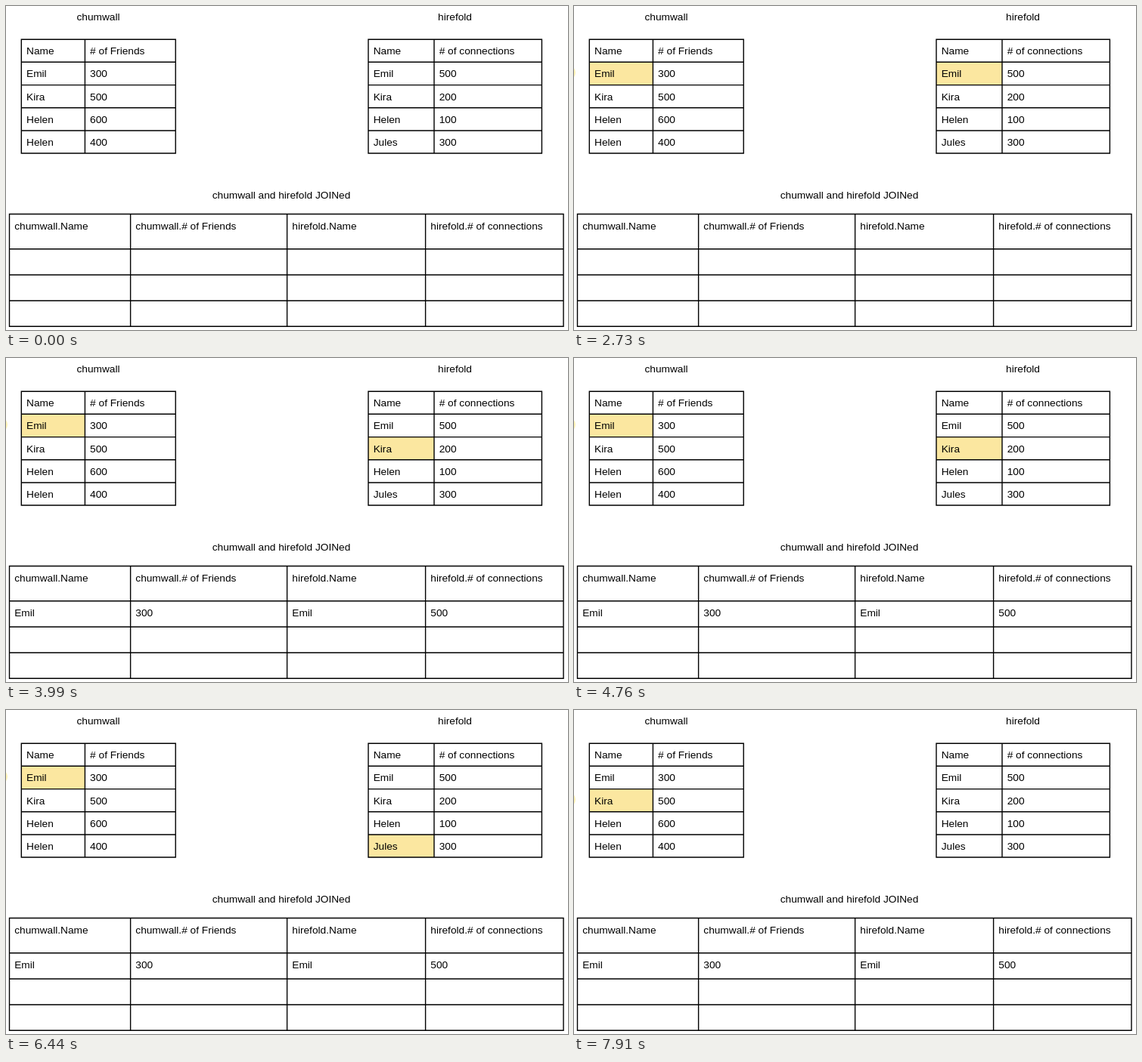
Recreate the animation shown at these times as an HTML page with a canvas. Size 743 by 429 pixels, loop 8000 ms.

```html
<!DOCTYPE html>
<html lang="en">
<head>
<meta charset="utf-8">
<title>Join, step by step</title>
<style>
  html, body { margin: 0; width: 100%; height: 100%; overflow: hidden; background: #fff; }
  canvas { display: block; width: 743px; height: 429px; }
</style>
</head>
<body>
<canvas id="stage"></canvas>
<script>
const W = 743, H = 429, LOOP = 8000;
const YELLOW = '#fbe7a0', GREEN = '#bbddab', HALO = '#fdf3b4';
const LEFT = 'chumwall', RIGHT = 'hirefold';

const canvas = document.getElementById('stage');
const scale = window.devicePixelRatio || 1;
canvas.width = W * scale;
canvas.height = H * scale;
const ctx = canvas.getContext('2d');
ctx.scale(scale, scale);

const sourceRows = [44.2, 74.3, 104.6, 134.8, 165, 195];
const friends = {
  xs: [20.3, 104.4, 224.2], ys: sourceRows,
  cells: [['Name', '# of Friends'], ['Emil', '300'], ['Kira', '500'], ['Helen', '600'], ['Helen', '400']]
};
const connections = {
  xs: [479, 566, 708.4], ys: sourceRows,
  cells: [['Name', '# of connections'], ['Emil', '500'], ['Kira', '200'], ['Helen', '100'], ['Jules', '300']]
};
const joined = {
  xs: [4.5, 164.6, 371.6, 554.6, 737], ys: [275.5, 321.7, 356, 390.2, 424.2],
  cells: [[LEFT + '.Name', LEFT + '.# of Friends', RIGHT + '.Name', RIGHT + '.# of connections']]
};
const match = ['Emil', '300', 'Emil', '500'];

// Each step: start time, highlighted left row, highlighted right row, match found
const steps = [
  [0, 0, 0, false],
  [280, 1, 0, false],
  [840, 1, 1, false],
  [3220, 1, 1, true],
  [3850, 1, 2, false],
  [5320, 1, 3, false],
  [6440, 1, 4, false],
  [7840, 2, 0, false]
];

function fillCell({ xs, ys }, row, col, color) {
  ctx.fillStyle = color;
  ctx.fillRect(xs[col], ys[row], xs[col + 1] - xs[col], ys[row + 1] - ys[row]);
}

function drawGrid({ xs, ys }) {
  const right = xs[xs.length - 1], bottom = ys[ys.length - 1];
  ctx.strokeStyle = '#000';
  ctx.lineWidth = 1.4;
  ctx.lineCap = 'square';
  ctx.beginPath();
  for (const x of xs) { ctx.moveTo(x, ys[0]); ctx.lineTo(x, bottom); }
  for (const y of ys) { ctx.moveTo(xs[0], y); ctx.lineTo(right, y); }
  ctx.stroke();
}

function drawText(text, x, baseline, align = 'left') {
  ctx.font = '13.7px "Liberation Sans", Arial, sans-serif';
  ctx.fillStyle = '#000';
  ctx.textAlign = align;
  ctx.fillText(text, x, baseline);
}

function drawTable(table, rows = table.cells) {
  drawGrid(table);
  rows.forEach((row, r) => row.forEach((text, c) =>
    drawText(text, table.xs[c] + 6.7, table.ys[r] + 20)));
}

function drawHalo(y) {
  ctx.fillStyle = HALO;
  ctx.beginPath();
  ctx.arc(-8, y, 10, 0, Math.PI * 2);
  ctx.fill();
}

function render(t) {
  const [, leftRow, rightRow, matched] = steps.filter(step => step[0] <= t).pop();
  const color = matched ? GREEN : YELLOW;
  ctx.fillStyle = '#fff';
  ctx.fillRect(0, 0, W, H);

  if (leftRow) {
    drawHalo(sourceRows[leftRow] + 14);
    fillCell(friends, leftRow, 0, color);
  }
  if (rightRow) fillCell(connections, rightRow, 0, color);
  if (matched) {
    fillCell(joined, 1, 0, GREEN);
    fillCell(joined, 1, 2, GREEN);
  }

  drawText(LEFT, 122, 19, 'center');
  drawText(RIGHT, 593.5, 19, 'center');
  drawText(`${LEFT} and ${RIGHT} JOINed`, 364, 255, 'center');
  drawTable(friends);
  drawTable(connections);
  drawTable(joined, t >= 3220 ? [...joined.cells, match] : joined.cells);
}

const start = performance.now();
function tick() {
  render((performance.now() - start) % LOOP);
  requestAnimationFrame(tick);
}
tick();
</script>
</body>
</html>
```
